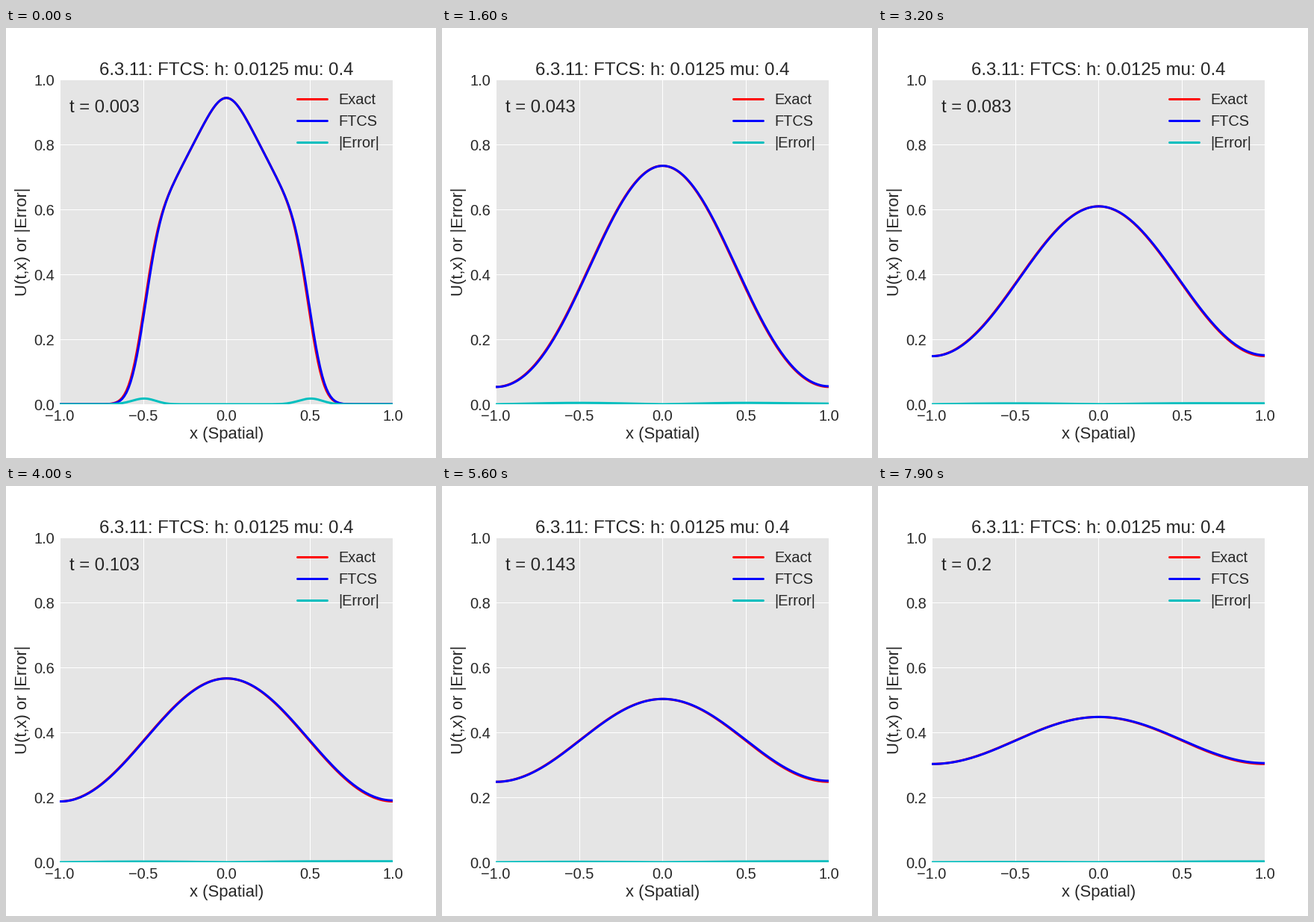
Write a matplotlib script that moves like this. It is 576 by 576 pixels and loops after 8000 ms.

```python
import math

import matplotlib.pyplot as plt
import numpy as np
from matplotlib.animation import FuncAnimation

H, MU = 0.0125, 0.4
STEPS = 40          # time steps per frame
FRAMES = 80
K = MU * H * H
INK = "0.15"

x = np.linspace(-1, 1, 161)


def exact(t, x):
    """Fourier series of the heat equation solution."""
    u = np.full_like(x, 3 / 8)
    for n in range(40):
        p = np.pi * (2 * n + 1)
        u += ((-1) ** n / p + 2 / p**2) * np.cos(p * x) * np.exp(-p * p * t)
        u += np.cos(2 * p * x) / p**2 * np.exp(-4 * p * p * t)
    return u


def ftcs():
    """Explicit scheme: exact value on the left, zero slope on the right."""
    v = np.where(np.abs(x) < 0.5 - H / 2, 1 - np.abs(x), 0.0)
    v[120] = 0.5    # the jump is kept at x = 0.5 and dropped at x = -0.5
    left = x[:1]
    states = []
    for n in range(1, FRAMES * STEPS + 1):
        new = v.copy()
        new[1:-1] += MU * (v[2:] - 2 * v[1:-1] + v[:-2])
        new[-1] += 2 * MU * (v[-2] - v[-1])
        new[0] = exact(n * K, left)[0]
        v = new
        if n % STEPS == 0:
            states.append(v)
    return states


states = ftcs()

plt.rcParams.update({
    "font.family": "Liberation Sans",
    "text.color": INK,
    "axes.labelcolor": INK,
    "lines.linewidth": 3,
    "lines.solid_capstyle": "round",
})

fig = plt.figure(figsize=(8, 8), dpi=72, facecolor="white")
fig.subplots_adjust(left=0.125, right=0.9, bottom=0.125, top=0.88)
ax = fig.add_subplot(facecolor="#E5E5E5")
ax.set_axisbelow(True)
ax.grid(color="white", lw=1, ls="-")
for side in ax.spines.values():
    side.set_visible(False)
ax.set(xlim=(-1, 1), ylim=(0, 1),
       xticks=np.linspace(-1, 1, 5), yticks=np.linspace(0, 1, 6))
ax.tick_params(length=0, pad=7, labelsize=20, labelcolor=INK)
ax.set_title("6.3.11: FTCS: h: 0.0125 mu: 0.4", fontsize=24, pad=6)
ax.set_xlabel("x (Spatial)", fontsize=22)
ax.set_ylabel("U(t,x) or |Error|", fontsize=22)

red, = ax.plot([], [], color="r", label="Exact")
blue, = ax.plot([], [], color="b", label="FTCS")
cyan, = ax.plot([], [], color="c", label="|Error|")
clock = ax.text(-0.94, 0.9, "", fontsize=24)
ax.legend(loc="upper right", fontsize=20, frameon=False)


def draw(i):
    u, v = exact((i + 1) * STEPS * K, x), states[i]
    red.set_data(x, u)
    blue.set_data(x, v)
    cyan.set_data(x, np.abs(u - v))
    clock.set_text(f"t = {math.floor(2.5 * (i + 1) + 0.5) / 1000}")
    return red, blue, cyan, clock


anim = FuncAnimation(fig, draw, frames=FRAMES, interval=100,
                     repeat=True, repeat_delay=0, blit=False)
plt.show()
```
